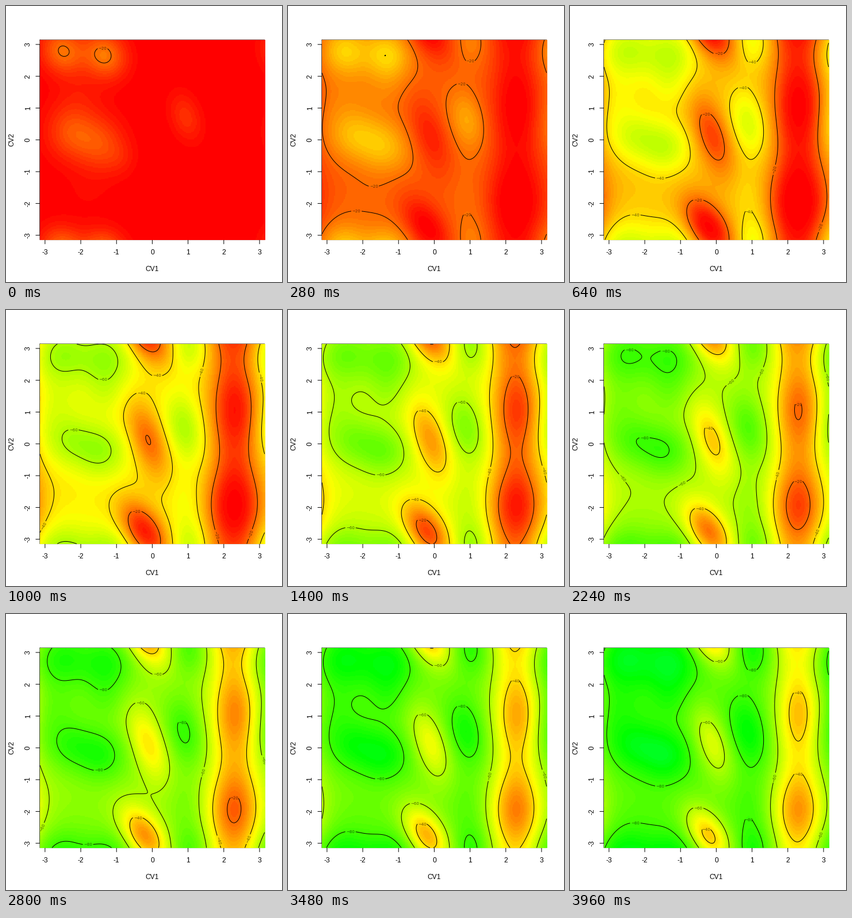
Animation, 480 px wide and 480 px high, one loop 4 s. Source, as a matplotlib script:

```python
import colorsys
import math

import matplotlib.pyplot as plt
import numpy as np
from matplotlib.animation import FuncAnimation
from matplotlib.collections import LineCollection
from matplotlib.colors import ListedColormap

SIZE, FRAMES, STEP = 480, 100, 40
PX = 0.72                                  # points per pixel at 100 dpi
LINE = 14.4                                # height of one margin line
LEFT, RIGHT, TOP, BOTTOM = 59.04, 449.76, 59.04, 406.56
W, H = RIGHT - LEFT, BOTTOM - TOP
N = 256
GAP, MIN_LENGTH = 18, 66                   # contour label gap, shortest labelled line

gx, gy = np.linspace(LEFT, RIGHT, N), np.linspace(BOTTOM, TOP, N)
GX, GY = np.meshgrid(gx, gy)


def bump(x, y, cx, cy, sx, sy, lean):
    """Periodic Gaussian of height 1; lean shifts it sideways with y."""
    dy = (y - cy + H / 2) % H - H / 2
    dx = (x - cx - lean * dy + W / 2) % W - W / 2
    return np.exp(-(dx / sx) ** 2 / 2 - (dy / sy) ** 2 / 2)


def surface(base, *groups):
    """Sum of bumps whose strengths make it pass through each given height."""
    spots = [(x, y, *shape) for shape, points in groups for x, y, _ in points]
    heights = np.array([p[2] for _, points in groups for p in points])
    at = np.array([s[:2] for s in spots], float).T
    mix = np.column_stack([bump(*at, *s) for s in spots])
    strength = np.linalg.solve(mix, heights - base)
    return base + sum(a * bump(GX, GY, *s) for a, s in zip(strength, spots))


# Each group: (width, height, lean) of its bumps, then their x, y and level.
land = surface(
    -50,
    # left basins and the shelf between them
    ((33, 38, 0), [(97, 78, -72.5), (175, 86, -73.5)]),
    ((32, 34, 0), [(108, 225, -70.5), (167, 246, -72.5)]),
    ((25, 28, 0), [(88, 158, -61), (132, 150, -59.2), (172, 150, -62.5)]),
    ((40, 25, 0), [(132, 338, -53)]),
    # seam where the plot wraps round
    ((20, 36, 0), [(60, 85, -59), (60, 195, -53), (58, 340, -37.5)]),
    # central hills
    ((22, 44, 0.28), [(247, 226, -28)]),
    ((25, 35, 0.4), [(240, 385, -13)]),
    ((22, 22, 0), [(255, 307, -45.5)]),
    # trough to their right
    ((24, 42, 0.16), [(310, 205, -68), (313, 335, -55)]),
    ((23, 31, 0), [(311, 120, -54), (319, 64, -62.5)]),
    # ridge
    ((34, 48, 0), [(397, 343, -3)]),
    ((30, 48, 0), [(397, 257, -18), (398, 172, -10.5), (394, 88, -22)]),
)

start = surface(
    0,
    ((26, 28, 0.1), [(98, 78, 21), (171, 85, 22.5)]),
    ((30, 34, 0), [(112, 218, 17), (163, 240, 16.5)]),
    ((32, 28, 0), [(130, 150, 6), (140, 325, 2.5)]),
    ((20, 22, 0), [(198, 265, 9)]),
    ((19, 30, 0.2), [(312, 193, 9.3)]),
)

# frame number and how far the landscape has filled by then
TIMES = [16, 35, 56, 70, 87, 99]
FILL = [-16, 0, 8.5, 14, 20, 24]


def depth(i):
    level = np.interp(i, TIMES, FILL)
    full = 4 * np.logaddexp(0, (level - land) / 4)
    share = min(i / TIMES[0], 1) ** 0.85
    return start + (full - start) * share


# ---- stage ----
fig = plt.figure(figsize=(SIZE / 100, SIZE / 100), dpi=100, facecolor="white")
back = fig.add_axes([0, 0, 1, 1])
back.set(xlim=(0, SIZE), ylim=(SIZE, 0))
back.axis("off")
plot = fig.add_axes([59 / SIZE, 1 - 407 / SIZE, 392 / SIZE, 348 / SIZE])


def stroke(xs, ys):
    back.plot(xs, ys, color="black", lw=PX, snap=False, solid_capstyle="round")


def word(x, y, text, turn=0):
    back.text(x, y, text, family="Liberation Sans", size=12 * PX, ha="center",
              va="baseline", rotation=turn, rotation_mode="anchor")


CX, CY = (LEFT + RIGHT) / 2, (TOP + BOTTOM) / 2
UX, UY = W / (2 * math.pi), H / (2 * math.pi)

stroke([LEFT, RIGHT, RIGHT, LEFT, LEFT], [TOP, TOP, BOTTOM, BOTTOM, TOP])
stroke([CX - 3 * UX, CX + 3 * UX], [BOTTOM, BOTTOM])
stroke([LEFT, LEFT], [CY - 3 * UY, CY + 3 * UY])
for v in range(-3, 4):
    x, y = CX + v * UX, CY - v * UY
    stroke([x, x], [BOTTOM, BOTTOM + LINE / 2])
    stroke([LEFT, LEFT - LINE / 2], [y, y])
    word(x, BOTTOM + 1.8 * LINE, str(v))
    word(LEFT - 1.2 * LINE, y, str(v), 90)
word(CX, BOTTOM + 3.8 * LINE, "CV1")
word(LEFT - 3.2 * LINE, CY, "CV2", 90)

colours = ListedColormap([colorsys.hsv_to_rgb(k / 135, 1, 1) for k in range(100)])
image = plot.imshow(start, cmap=colours, vmin=0, vmax=200, origin="lower",
                    extent=(59, 451, 407, 59), aspect="auto", interpolation="nearest")
plot.axis("off")
lines = LineCollection([], colors="black", linewidths=PX, zorder=3)
plot.add_collection(lines, autolim=False)
labels = []


def resample(seg):
    """Points one pixel apart along a line, and its length."""
    run = np.r_[0, np.cumsum(np.hypot(*np.diff(seg, axis=0).T))]
    at = np.linspace(0, run[-1], max(int(run[-1]), 2))
    return np.c_[np.interp(at, run, seg[:, 0]), np.interp(at, run, seg[:, 1])], run[-1]


def label_spot(pts, taken):
    """Start of the flattest stretch that stays clear of other labels."""
    a, b = pts[:-GAP], pts[GAP:]
    dx, dy = np.abs(b - a).T
    mid = (a + b) / 2
    side = -1 if pts[:, 0].mean() < 210 else 1
    score = dy / np.maximum(dx, 0.01) + 0.002 * side * mid[:, 1]
    for p in taken:
        score = score + 1e4 * (np.hypot(*(mid - p).T) < GAP)
    return int(np.argmin(score))


def add_label(a, b, level):
    turn = math.degrees(math.atan2(a[1] - b[1], b[0] - a[0]))
    labels.append(plot.text(
        *(a + b) / 2, f"\u2212{level}", family="DejaVu Sans", size=7 * PX, alpha=0.6,
        ha="center", va="center_baseline", rotation=(turn + 90) % 180 - 90,
        rotation_mode="anchor", clip_on=True, zorder=4))


def contours(field):
    levels = [v for v in range(20, 100, 20) if field.min() < v < field.max()]
    if not levels:
        return
    found = plot.contour(gx, gy, field, levels=levels)
    groups = found.allsegs
    found.remove()
    for level, segs in zip(levels, groups):
        for seg in segs:
            if len(seg) > 1:
                yield level, seg


def update(i):
    field = depth(i)
    image.set_data(field)
    for t in labels:
        t.remove()
    labels.clear()
    pieces, taken = [], []
    for level, seg in contours(field):
        pts, length = resample(seg)
        if length < MIN_LENGTH:
            pieces.append(seg)
            continue
        k = label_spot(pts, taken)
        a, b = pts[k], pts[k + GAP]
        taken.append((a + b) / 2)
        pieces += [pts[:k + 1], pts[k + GAP:]]
        add_label(a, b, level)
    lines.set_segments(pieces)
    plot.set(xlim=(59, 451), ylim=(407, 59))
    return [image, lines, *labels]


anim = FuncAnimation(fig, update, frames=FRAMES, interval=STEP, repeat=True,
                     repeat_delay=0, blit=False)
plt.show()
```
